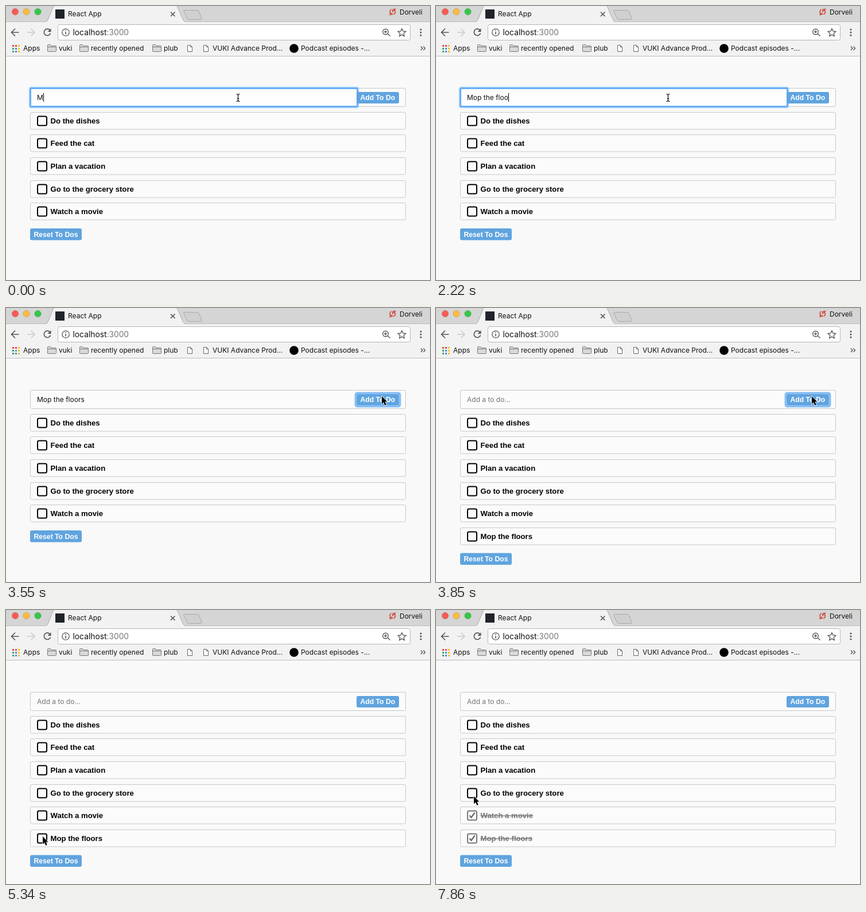
An HTML page that plays this animation: 739x478 px, repeating every 8000 ms.

```html
<!DOCTYPE html>
<html lang="en">
<head>
<meta charset="utf-8">
<title>To do list</title>
<style>
  html, body { margin: 0; width: 100%; height: 100%; overflow: hidden; background: #f9f9f9; }
  svg { display: block; }
  text { font: 12px Inter, sans-serif; fill: #111; }
  .item { font: bold 13.15px "Liberation Sans", Arial, sans-serif; fill: #000; }
  .label { font: bold 12.2px "Liberation Sans", Arial, sans-serif; fill: #fff; }
  .frame { fill: #fbfbfb; stroke: #c8c8c8; }
  .button { fill: #60a4df; }
  .icon { fill: none; stroke: #555; stroke-width: 1.7; }
  .box { fill: none; stroke: #000; stroke-width: 2; }
  .tick { fill: none; stroke: #666; stroke-width: 2.2; visibility: hidden; }
  .done .box { stroke: #777; }
  .done .tick { visibility: visible; }
  .done .item { fill: #777; text-decoration: line-through; }
  .ring { fill: none; stroke: #6aaef6; stroke-width: 3; }
  .glow { fill: none; stroke: #a5cffa; stroke-width: 5; opacity: .65; }
</style>
</head>
<body>
<svg width="739" height="478" viewBox="0 0 739 478">
  <defs>
    <g id="folder" fill="#d9d9d9" stroke="#777">
      <path d="M.5 12V1.5q0-1 1-1H5.5l1.5 2h7.5q1 0 1 1V11.500q0 1-1 1H1.500q-1 0-1-1z"/>
      <path d="M1 4.500H15"/>
    </g>
    <path id="page" d="M.5.5H5.500L8.500 3.500V11.500H.5zM5.500.5V3.500H8.500" fill="#fff" stroke="#666"/>
  </defs>

  <!-- Browser window -->
  <rect width="739" height="28" fill="#d5d5d5"/>
  <rect y="27" width="739" height="61" fill="#f2f2f2"/>
  <path d="M0 27.500H70M312 27.500H739M0 87.500H739" stroke="#bdbdbd"/>
  <path d="M69 28Q72 27 73.500 23L82 2Q83 0 85 0H295Q298 0 299 2L308 23Q310 27.500 313 28z" fill="#f2f2f2"/>
  <path d="M69 27.500Q72 27 73.500 23L82 2Q83 0 84 -1M297 -1L299 2L308 23Q310 27.500 313 27.500" fill="none" stroke="#aaa"/>
  <path d="M311 7.500H333Q335.500 7.500 336.500 10L341 21Q342 23.500 339 23.500H319Q316.500 23.500 315.500 21L310 9.500Q309 7.500 311 7.500z" fill="#d0d0d0" stroke="#a8a8a8"/>
  <g stroke-opacity=".15" stroke="#000">
    <circle cx="16" cy="10" r="5.700" fill="#fc5a55"/>
    <circle cx="35.500" cy="10" r="5.700" fill="#fdbc40"/>
    <circle cx="55.500" cy="10" r="5.700" fill="#34c749"/>
  </g>
  <rect x="86" y="6" width="16" height="16" fill="#20232a"/>
  <text x="108" y="18">React App</text>
  <path class="icon" d="M287 10.500l7.500 7.500m0-7.500l-7.500 7.500"/>
  <g fill="none" stroke="#d0483c" stroke-width="1.600">
    <path d="M671.500 5.500Q667 10 671 14.500M668 15H671.700V11.500M676 15Q680.500 10.500 676.500 6M679.500 5.500H676V9"/>
    <path d="M674 5.500V11M674 13V15"/>
  </g>
  <text x="686" y="15">Dorveli</text>

  <path class="icon" d="M22.500 46H10M16 39.500L9.500 46L16 52.500"/>
  <path class="icon" d="M37 46H49.500M43.500 39.500L50 46L43.500 52.500" style="stroke:#ccc"/>
  <path class="icon" d="M76.300 41.700A5.800 5.800 0 1 0 77.600 47.500"/>
  <path d="M78.500 39V45H72.500z" fill="#555"/>
  <rect x="90.500" y="32.500" width="614" height="27" rx="3" fill="#fff" stroke="#b5b5b5"/>
  <circle class="icon" cx="104" cy="46" r="6.200" style="stroke-width:1.300"/>
  <path d="M104 42V43.600M104 45V49.500" stroke="#555" stroke-width="1.600"/>
  <text x="116.500" y="51" style="font-size:13.800px">localhost<tspan fill="#777">:3000</tspan></text>
  <path class="icon" d="M665.300 48.500L669.500 52.500M659 45H664M661.500 42.500V47.500" style="stroke-width:1.400"/>
  <circle class="icon" cx="661.500" cy="45" r="4.800" style="stroke-width:1.400"/>
  <path class="icon" d="M690 39.500l2 4.500 4.900.5-3.700 3.300 1.100 4.800-4.300-2.500-4.300 2.500 1.100-4.800-3.700-3.300 4.900-.5z" style="stroke-width:1.300"/>
  <g fill="#555"><circle cx="723" cy="41" r="1.600"/><circle cx="723" cy="46" r="1.600"/><circle cx="723" cy="51" r="1.600"/></g>

  <!-- Bookmarks -->
  <g id="apps"></g>
  <text x="30" y="78">Apps</text>
  <use href="#folder" x="72" y="67"/><text x="92" y="78">vuki</text>
  <use href="#folder" x="128" y="67"/><text x="148" y="78">recently opened</text>
  <use href="#folder" x="255" y="67"/><text x="275" y="78">plub</text>
  <use href="#page" x="316" y="68"/>
  <use href="#page" x="344" y="68"/><text x="360" y="78">VUKI Advance Prod...</text>
  <circle cx="502" cy="74" r="7.800"/><text x="514" y="78">Podcast episodes -...</text>
  <path class="icon" d="M723 70.500l3 3.200-3 3.200m4.500-6.400l3 3.200-3 3.200" style="stroke-width:1.400"/>

  <!-- To do form -->
  <rect class="frame" x="42.500" y="143.500" width="654" height="32" rx="2.500"/>
  <g id="inputFocus">
    <rect class="glow" x="42" y="143" width="571" height="33" rx="2"/>
    <rect class="ring" x="42.500" y="143.500" width="570" height="32" rx="1.500" style="fill:#fefefe"/>
  </g>
  <text id="entry" x="54" y="164" xml:space="preserve"></text>
  <rect id="caret" y="152" width="1" height="15"/>
  <g id="addFocus">
    <rect class="glow" x="609.500" y="148.500" width="77" height="23" rx="3"/>
    <rect class="ring" x="609.500" y="148.500" width="77" height="23" rx="3" style="stroke-width:2"/>
    <rect x="610.500" y="149.500" width="75" height="21" rx="3" fill="#c9e2fa"/>
  </g>
  <rect class="button" x="611" y="150" width="74" height="20" rx="3"/>
  <text class="label" x="617.500" y="164">Add To Do</text>
  <g id="list"></g>
  <g id="reset">
    <rect class="button" x="42" y="388" width="90" height="20.500" rx="3"/>
    <text class="label" x="48.500" y="402.500">Reset To Dos</text>
  </g>

  <!-- Pointers -->
  <path id="beam" d="M401.500 153.500Q404.500 153.500 404.500 156V164Q404.500 166.500 401.500 166.500M407.500 153.500Q404.500 153.500 404.500 156M404.500 164Q404.500 166.500 407.500 166.500M402.500 161.500H406.500" fill="none" stroke="#111" stroke-width="1.200"/>
  <path id="arrow" d="M0 0V13.200L3 10.400L5.300 15.800L7.700 14.800L5.400 9.600H9.500z" stroke="#fff" stroke-width="1.400" paint-order="stroke"/>
</svg>
<script>
const $ = id => document.getElementById(id);
const show = (id, on) => $(id).style.display = on ? '' : 'none';
const LOOP = 8000, PHRASE = 'Mop the floors', ROW = 39.55;
const BLUR = 3550, ADDED = 3850, ADD_BLUR = 5340;

// [start time, letters typed]
const typing = [[0, 1], [140, 2], [290, 3], [890, 4], [1190, 5], [1340, 6], [1480, 7],
  [1630, 8], [1920, 10], [2070, 11], [2220, 12], [2370, 13], [2520, 14]];

// [start time, x, y] of the arrow tip
const moves = [[2810, 728, 133], [2960, 700, 142], [3110, 672, 150], [3250, 658, 154], [3400, 655, 154],
  [4150, 239, 307], [4300, 100, 400], [4450, 77, 433], [4590, 66, 424], [4740, 58, 410],
  [4890, 59, 402], [5040, 62, 397], [5190, 64, 395],
  [6380, 62, 380], [6530, 58, 361], [6670, 59, 351], [6820, 61, 356],
  [7560, 70, 345], [7710, 77, 331], [7860, 66, 325]];

const latest = (steps, t) => steps.filter(s => s[0] <= t).pop();

const appColors = ['#e8453c', '#e8453c', '#f9bb2d', '#3aa757', '#4688f1', '#f9bb2d', '#3aa757', '#4688f1', '#f9bb2d'];
$('apps').innerHTML = appColors.map((color, i) =>
  `<rect x="${11 + i % 3 * 5}" y="${68 + Math.floor(i / 3) * 5}" width="3" height="3" fill="${color}"/>`).join('');

const todos = ['Do the dishes', 'Feed the cat', 'Plan a vacation', 'Go to the grocery store', 'Watch a movie', PHRASE];
$('list').innerHTML = todos.map((todo, i) => {
  const y = Math.round(185 + ROW * i - .1);
  return `<g id="todo${i}" transform="translate(0 ${y})">
    <rect class="frame" x="42.500" y=".5" width="654" height="29.500" rx="2.500"/>
    <rect class="box" x="55" y="7.500" width="16" height="16" rx="2.500"/>
    <path class="tick" d="M58.500 15.500L61.500 19L67.500 10.500"/>
    <text class="item" x="77.500" y="20">${todo}</text></g>`;
}).join('');

function draw(t) {
  const added = t >= ADDED;
  const entry = $('entry');
  entry.textContent = added ? 'Add a to do...' : PHRASE.slice(0, latest(typing, t)[1]);
  entry.style.fill = added ? '#757575' : '#111';
  $('caret').setAttribute('x', Math.round(54 + entry.getComputedTextLength()));
  show('caret', t < moves[0][0]);
  show('inputFocus', t < BLUR);
  show('addFocus', t >= BLUR && t < ADD_BLUR);

  show('todo5', added);
  $('reset').setAttribute('transform', `translate(0 ${added ? ROW : 0})`);
  $('todo5').classList.toggle('done', t >= 5790);
  $('todo4').classList.toggle('done', t >= 7120);

  const tip = latest(moves, t);
  show('beam', !tip);
  show('arrow', tip);
  if (tip) $('arrow').setAttribute('transform', `translate(${tip[1]} ${tip[2]})`);
}

const start = performance.now();
(function tick() {
  draw((performance.now() - start) % LOOP);
  requestAnimationFrame(tick);
})();
</script>
</body>
</html>
```
